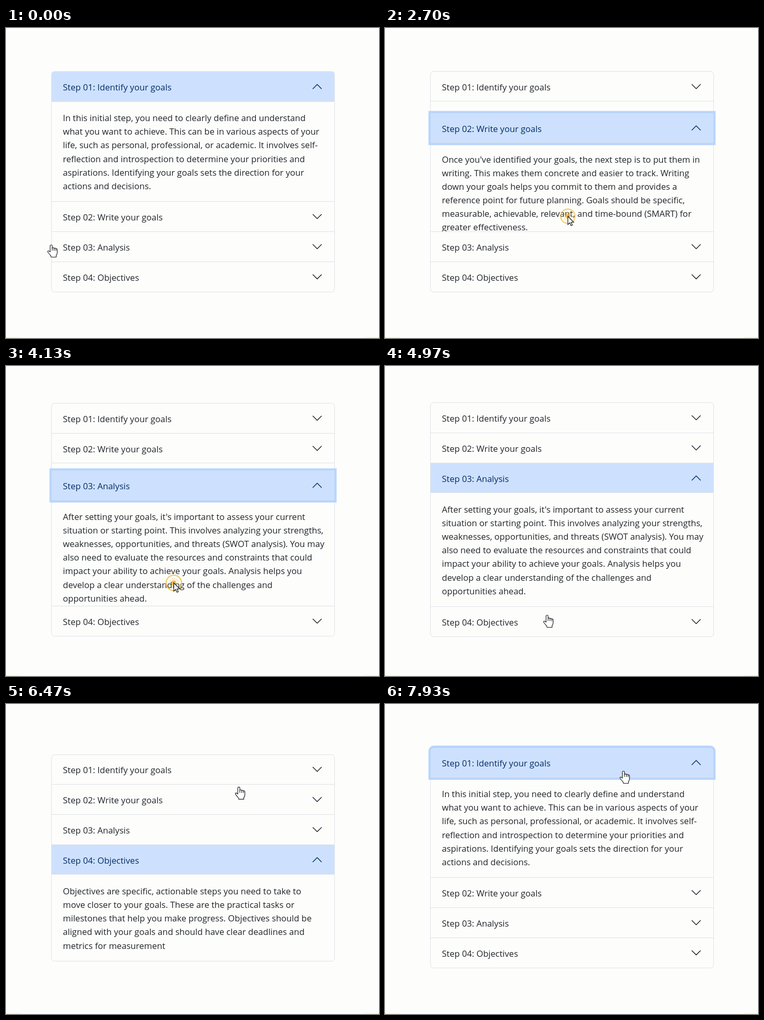
Write an HTML page with a canvas that moves like this. It is 718 px wide and 596 px high and loops after 8130 ms.

```html
<!DOCTYPE html>
<html lang="en">
<head>
<meta charset="utf-8">
<title>Accordion</title>
<style>
  html, body { margin: 0; width: 100%; height: 100%; overflow: hidden; background: #fdfdfc; }
  canvas { display: block; }
</style>
</head>
<body>
<canvas id="stage" width="718" height="596"></canvas>
<script>
const ctx = document.getElementById('stage').getContext('2d');
const LOOP = 8130;
const LEFT = 87, RIGHT = 633, MIDDLE = 295.2;
const HEAD = 57.9, LINE = 26.18, PAD = 17.45;
const FONT = '16.6px "Open Sans", "Noto Sans", sans-serif';
const BORDER = '#dee2e6', RING = '#b9d5fc';
const PAGE = [253, 253, 252], ACTIVE = [205, 225, 255];
const INK = [33, 37, 41], ACTIVE_INK = [5, 44, 101];

const items = [
  ['Step 01: Identify your goals',
    'In this initial step, you need to clearly define and understand',
    'what you want to achieve. This can be in various aspects of your',
    'life, such as personal, professional, or academic. It involves self-',
    'reflection and introspection to determine your priorities and',
    'aspirations. Identifying your goals sets the direction for your',
    'actions and decisions.'],
  ['Step 02: Write your goals',
    "Once you've identified your goals, the next step is to put them in",
    'writing. This makes them concrete and easier to track. Writing',
    'down your goals helps you commit to them and provides a',
    'reference point for future planning. Goals should be specific,',
    'measurable, achievable, relevant, and time-bound (SMART) for',
    'greater effectiveness.'],
  ['Step 03: Analysis',
    "After setting your goals, it's important to assess your current",
    'situation or starting point. This involves analyzing your strengths,',
    'weaknesses, opportunities, and threats (SWOT analysis). You may',
    'also need to evaluate the resources and constraints that could',
    'impact your ability to achieve your goals. Analysis helps you',
    'develop a clear understanding of the challenges and',
    'opportunities ahead.'],
  ['Step 04: Objectives',
    'Objectives are specific, actionable steps you need to take to',
    'move closer to your goals. These are the practical tasks or',
    'milestones that help you make progress. Objectives should be',
    'aligned with your goals and should have clear deadlines and',
    'metrics for measurement']
].map(([title, ...lines]) => ({ title, lines, full: lines.length * LINE + 2 * PAD }));

// blur: when the focus ring disappears
const clicks = [
  { at: -5000, item: 0, blur: -4000 },
  { at: 2490, item: 1, blur: 3670 },
  { at: 3893, item: 2, blur: 4500 },
  { at: 5194, item: 3, blur: 5900 },
  { at: 7134, item: 0, blur: LOOP }
];

// time, x, y of the pointer's hot spot
const path = [
  [30, 87, 417], [840, 330, 168], [1430, 268, 327], [1670, 268, 327],
  [1870, 288, 367], [2270, 352, 362], [2970, 352, 362], [3470, 323, 417],
  [4470, 323, 417], [4970, 312, 479], [5900, 312, 479], [6690, 474, 99],
  [7000, 459, 129]
];

const HAND = new Path2D('M-2 12V2a2 2 0 0 1 4 0V6q2-1.6 3.6 .6q2.2-1.2 3.4 .8q2.6-.8 2.6 2V15q0 3-2 5V23.5H0q0-2-2-4l-4-5q-1.6-2.6 .4-3q1.6-.2 3.6 2z');
const KNUCKLES = new Path2D('M2 6v5M5.6 6.6v4.6M9 7.4v4');
const ARROW = new Path2D('M0 0V16l3.7-3.5 2.4 5.6 2.6-1.1-2.4-5.5h5z');

const clamp = v => Math.min(1, Math.max(0, v));
const lerp = (a, b, k) => a + (b - a) * k;
const mix = (a, b, k) => `rgb(${a.map((v, i) => Math.round(lerp(v, b[i], k))).join(',')})`;

function bezier(x1, y1, x2, y2) {
  const at = (s, a, b) => 3 * (1 - s) * (1 - s) * s * a + 3 * (1 - s) * s * s * b + s * s * s;
  return x => {
    if (x <= 0) return 0;
    if (x >= 1) return 1;
    let lo = 0, hi = 1;
    for (let i = 0; i < 24; i++) {
      const s = (lo + hi) / 2;
      if (at(s, x1, x2) < x) lo = s; else hi = s;
    }
    return at(lo, y1, y2);
  };
}
const ease = bezier(.25, .1, .25, 1);
const easeInOut = bezier(.42, 0, .58, 1);

function pointer(t) {
  if (t <= path[0][0]) return path[0].slice(1);
  const i = path.findIndex(p => p[0] > t);
  if (i < 0) return path[path.length - 1].slice(1);
  const a = path[i - 1], b = path[i];
  const k = easeInOut((t - a[0]) / (b[0] - a[0]));
  return [lerp(a[1], b[1], k), lerp(a[2], b[2], k)];
}

function layout(t) {
  let n = clicks.length - 1;
  while (n > 0 && clicks[n].at > t) n--;
  const click = clicks[n], before = n ? clicks[n - 1].item : -1, age = t - click.at;
  const share = (i, p) => i === click.item ? p : i === before ? 1 - p : 0;
  const rows = items.map((item, i) => ({
    item,
    body: item.full * share(i, ease(age / 350)),
    turn: share(i, easeInOut(age / 200)),
    glow: share(i, easeInOut(age / 150))
  }));
  const height = rows.reduce((h, r) => h + HEAD + r.body, 0);
  const top = MIDDLE - height / 2;
  let y = top;
  for (const r of rows) {
    r.y = y;
    y += HEAD + r.body;
  }
  return { rows, click, age, top, height };
}

function hline(y) {
  ctx.fillStyle = BORDER;
  ctx.fillRect(LEFT, Math.round(y), RIGHT - LEFT, 1);
}

function chevron(y, turn, color) {
  ctx.save();
  ctx.translate(599, y + 29.2);
  ctx.rotate(-Math.PI * turn);
  ctx.scale(1.3625, 1.3625);
  ctx.beginPath();
  ctx.moveTo(-6, -3);
  ctx.lineTo(0, 3);
  ctx.lineTo(6, -3);
  ctx.lineWidth = 1.05;
  ctx.lineCap = ctx.lineJoin = 'round';
  ctx.strokeStyle = color;
  ctx.stroke();
  ctx.restore();
}

function drawRow(r, index) {
  const y = Math.round(r.y), end = Math.round(r.y + HEAD);
  const ink = mix(INK, ACTIVE_INK, r.glow);
  if (r.glow > 0) {
    ctx.fillStyle = mix(PAGE, ACTIVE, r.glow);
    ctx.fillRect(LEFT + 1, y + (index ? 0 : 1), RIGHT - LEFT - 2, end - y);
  }
  if (index) hline(r.y);
  ctx.fillStyle = ink;
  ctx.fillText(r.item.title, 109.5, Math.round(r.y + 36.7));
  chevron(r.y, r.turn, ink);
  if (r.body <= 0) return;
  hline(r.y + HEAD - 1);
  ctx.save();
  ctx.beginPath();
  ctx.rect(LEFT, end, RIGHT - LEFT, r.body);
  ctx.clip();
  ctx.fillStyle = mix(INK, INK, 0);
  r.item.lines.forEach((line, i) =>
    ctx.fillText(line, 109.5, Math.round(r.y + HEAD + 37.7 + i * LINE)));
  ctx.restore();
}

function drawRing({ click, age, rows }, t) {
  if (t >= click.blur) return;
  const k = clamp(age / 100), spread = lerp(1.2, 4.36, k);
  const x = LEFT + 1, y = rows[click.item].y + 1, w = RIGHT - LEFT - 2, h = HEAD - 1;
  const inner = click.item ? 0 : 6, outer = click.item ? 0 : 6 + spread;
  ctx.beginPath();
  ctx.roundRect(x - spread, y - spread, w + 2 * spread, h + 2 * spread, [outer, outer, 0, 0]);
  ctx.roundRect(x, y, w, h, [inner, inner, 0, 0]);
  ctx.fillStyle = RING;
  ctx.fill('evenodd');
}

function circle(x, y, r) {
  ctx.beginPath();
  ctx.arc(x, y, r, 0, 2 * Math.PI);
}

function drawRipple({ click, age }) {
  const u = age / 430;
  if (u <= 0 || u >= 1) return;
  const [x, y] = pointer(click.at), r = 5.3 + 17.2 * u;
  const alpha = clamp(u * 1.4) * clamp((1 - u) / .22);
  ctx.globalAlpha = alpha;
  ctx.strokeStyle = '#eebc3a';
  ctx.lineWidth = 2.3;
  circle(x, y, r);
  ctx.stroke();
  ctx.globalAlpha = alpha * .5;
  ctx.lineWidth = 1.5;
  circle(x, y, r * .56);
  ctx.stroke();
  ctx.globalAlpha = alpha;
  ctx.fillStyle = '#f5aa1e';
  circle(x, y, 5 * clamp(u * 3));
  ctx.fill();
  ctx.globalAlpha = 1;
}

function drawPointer(rows, x, y) {
  const onHead = x >= LEFT && x <= RIGHT && rows.some(r => y >= r.y && y < r.y + HEAD);
  ctx.save();
  ctx.translate(x, y);
  ctx.fillStyle = '#fff';
  ctx.strokeStyle = '#16181a';
  ctx.lineWidth = 1.15;
  ctx.lineJoin = onHead ? 'round' : 'miter';
  const shape = onHead ? HAND : ARROW;
  ctx.fill(shape);
  ctx.stroke(shape);
  if (onHead) ctx.stroke(KNUCKLES);
  ctx.restore();
}

function draw(t) {
  const state = layout(t), { rows, top, height } = state;
  const y = Math.round(top), h = Math.round(top + height) - y;
  ctx.fillStyle = mix(PAGE, PAGE, 0);
  ctx.fillRect(0, 0, 718, 596);
  ctx.fillStyle = '#ffffa8';
  ctx.fillRect(0, 594, 28, 2);
  ctx.fillRect(690, 594, 28, 2);

  ctx.font = FONT;
  ctx.save();
  ctx.beginPath();
  ctx.roundRect(LEFT, y, RIGHT - LEFT, h + 1, 6.5);
  ctx.clip();
  rows.forEach(drawRow);
  ctx.restore();

  ctx.beginPath();
  ctx.roundRect(LEFT + .5, y + .5, RIGHT - LEFT - 1, h, 6);
  ctx.strokeStyle = BORDER;
  ctx.lineWidth = 1;
  ctx.stroke();

  drawRing(state, t);
  drawRipple(state);
  drawPointer(rows, ...pointer(t));
}

const start = performance.now();
function frame() {
  draw((performance.now() - start) % LOOP);
  requestAnimationFrame(frame);
}
frame();
</script>
</body>
</html>
```
